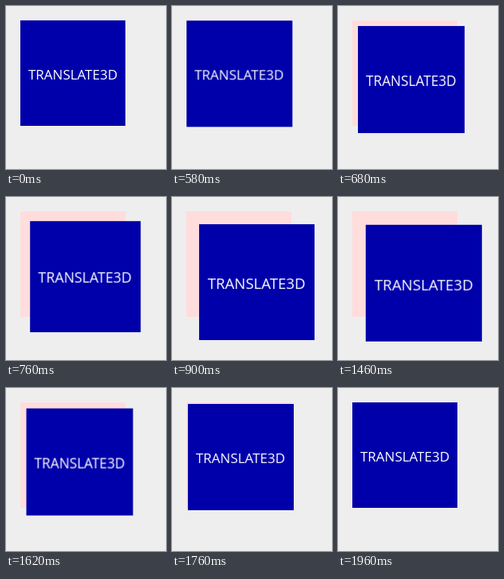
An HTML page for the animation above (2.76 s loop, 201 by 204 pixels).

```html
<!DOCTYPE html>
<html lang="en">
<head>
<meta charset="utf-8">
<title>translate3d</title>
<style>
  html, body {
    margin: 0;
    width: 100%;
    height: 100%;
    overflow: hidden;
    background: #eee;
  }
  .slot {
    position: absolute;
    left: 18px;
    top: 18px;
    width: 132px;
    height: 132px;
    background: #fdd;
  }
  .box {
    display: flex;
    align-items: center;
    justify-content: center;
    box-sizing: border-box;
    width: 100%;
    height: 100%;
    padding-top: 2px;
    background: #00a;
    color: #fff;
    font: 17px "Open Sans", "Noto Sans", sans-serif;
    white-space: nowrap;
  }
</style>
</head>
<body>
<div class="slot"><div class="box">TRANSLATE3D</div></div>
<script>
  const LOOP = 2760;
  const REST = 'perspective(none) translate3d(0, 0, 0)';
  const MOVED = 'perspective(500px) translate3d(22px, 22px, 50px)';

  // [time in ms, pose, easing towards the next step]
  const steps = [
    [0, REST, 'linear'],
    [568, REST, 'ease'],
    [1068, MOVED, 'linear'],
    [1442, MOVED, 'ease'],
    [1942, REST, 'linear'],
    [LOOP, REST, 'linear'],
  ];

  document.querySelector('.box').animate(
    steps.map(([t, transform, easing]) => ({ offset: t / LOOP, transform, easing })),
    { duration: LOOP, iterations: Infinity }
  );
</script>
</body>
</html>
```
